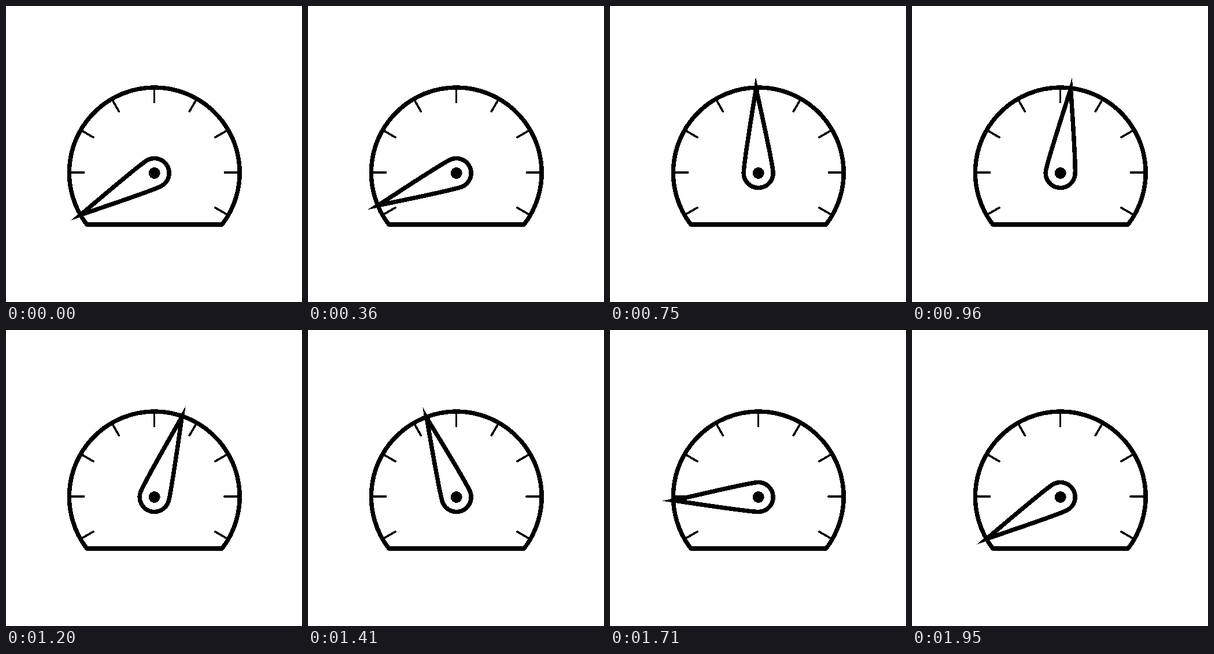
An HTML page for the animation above (2.7 s loop, 512 by 512 pixels).

```html
<!DOCTYPE html>
<html lang="en">
<head>
<meta charset="utf-8">
<title>Gauge</title>
<style>
  html, body { margin: 0; width: 100%; height: 100%; overflow: hidden; background: #fff; }
  svg { display: block; width: 100%; height: 100%; }
</style>
</head>
<body>
<svg viewBox="0 0 512 512" fill="none" stroke="#000" stroke-width="7.5" shape-rendering="crispEdges">
  <path d="M139.8 378A147.4 147.4 0 1 1 373.8 378Z" stroke-linejoin="round"/>
  <g id="ticks" transform="translate(256.4 288)" stroke-width="3.7" stroke-linecap="round"></g>
  <g transform="translate(256.7 289)">
    <path id="needle" fill="#fff" stroke-miterlimit="10"
      d="M0-146.5C12.8-80 25.5-13 25.5 0A25.5 25.5 0 0 1-25.5 0C-25.5-13-12.8-80 0-146.5Z"/>
    <circle r="10" fill="#000" stroke="none"/>
  </g>
</svg>
<script>
  const LOOP = 2700, STEP = 30, REST = -119.5;
  // [time in ms, needle angle in degrees clockwise from straight up]
  const keys = [[0, REST], [322, REST], [602, 21.5], [840, -12.5], [1080, 26.5], [1950, REST], [LOOP, REST]];
  const ticks = document.getElementById('ticks');
  const needle = document.getElementById('needle');

  for (let angle = -120; angle <= 120; angle += 30) {
    const tick = document.createElementNS('http://www.w3.org/2000/svg', 'path');
    tick.setAttribute('d', 'M0-121.8V-148');
    tick.setAttribute('transform', `rotate(${angle})`);
    ticks.append(tick);
  }

  const smooth = u => u * u * (3 - 2 * u);

  function angleAt(time) {
    const next = keys.findIndex(([t]) => t > time);
    const [t0, a0] = keys[next - 1], [t1, a1] = keys[next];
    return a0 + (a1 - a0) * smooth((time - t0) / (t1 - t0));
  }

  function draw() {
    const time = Math.floor(performance.now() % LOOP / STEP) * STEP;
    needle.setAttribute('transform', `rotate(${angleAt(time)})`);
    requestAnimationFrame(draw);
  }
  draw();
</script>
</body>
</html>
```
